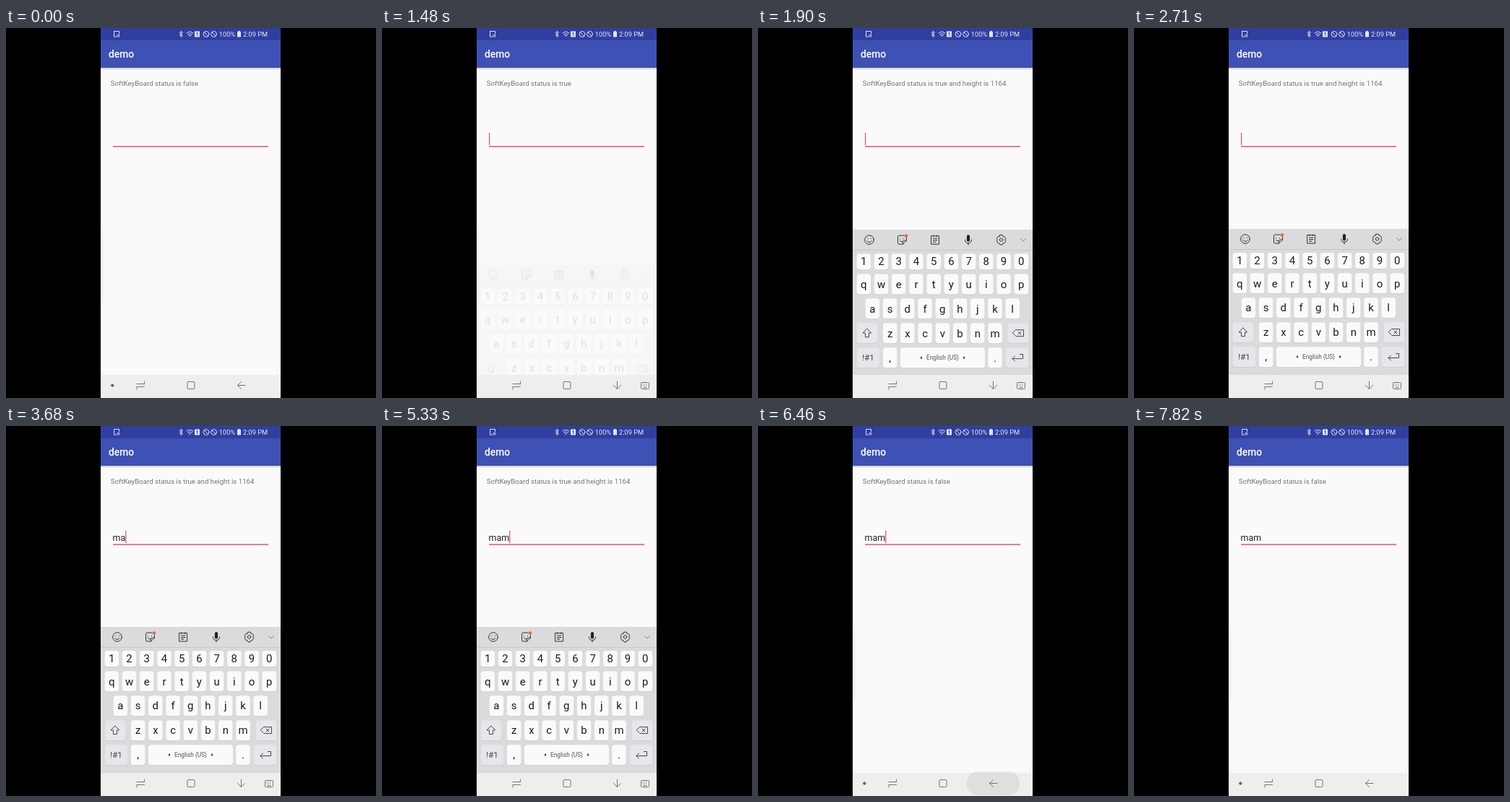
An HTML page for the animation above (8 s loop, 512 px wide and 512 px high).

```html
<!DOCTYPE html>
<html lang="en">
<head>
<meta charset="utf-8">
<title>Soft keyboard demo</title>
<style>
html, body { margin: 0; width: 100%; height: 100%; overflow: hidden; background: #000; }
svg { display: block; width: 100vw; height: 100vh; font-family: Roboto, "Noto Sans", sans-serif; }
.line { fill: none; stroke-width: 1; stroke-linecap: round; stroke-linejoin: round; }
.mid { text-anchor: middle; }
</style>
</head>
<body>
<svg viewBox="0 0 512 512">
  <defs>
    <clipPath id="screen"><rect x="131" width="249" height="512"/></clipPath>
    <clipPath id="aboveNav"><rect x="131" width="249" height="480"/></clipPath>
    <clipPath id="pill"><rect x="289" y="478" width="73" height="33" rx="15"/></clipPath>
    <linearGradient id="shade" x2="0" y2="1">
      <stop offset="0" stop-color="#c4c4c6"/><stop offset="1" stop-color="#fafafa"/>
    </linearGradient>
  </defs>
  <rect width="512" height="512"/>
  <g clip-path="url(#screen)">
    <rect x="131" width="249" height="512" fill="#fafafa"/>
    <rect x="131" y="55" width="249" height="3" fill="url(#shade)"/>
    <rect x="131" y="17" width="249" height="38" fill="#3f51b5"/>
    <rect x="131" width="249" height="17" fill="#303f9f"/>
    <text x="142" y="41.3" font-size="13.8" font-weight="500" fill="#fff">demo</text>

    <g class="line" stroke="#dfe2f0">
      <path d="M152.500 12h-3v-7.500h7v3.500"/><circle cx="155.300" cy="10.800" r="1.500"/>
      <path d="M240 6l4.400 4.400-2.200 2.200v-8.400l2.200 2.200-4.400 4.400"/>
      <path d="M250 7q4.500-3.600 9 0M251.500 9q3-2.300 6 0M253.300 10.800h2.400"/>
      <circle cx="277" cy="8.500" r="3.800"/><path d="M274.500 6l5 5"/>
      <circle cx="287.500" cy="8.500" r="3.800"/><path d="M285 6l5 5"/>
    </g>
    <path d="M261 4.500h7v8h-7z M320 5h1.300v-1h2.400v1h1.300v7.500h-5z" fill="#dfe2f0"/>
    <text class="mid" x="264.500" y="11" font-size="7" font-weight="700" fill="#303f9f">1</text>
    <g font-size="9.250" fill="#dfe2f0">
      <text x="294.800" y="12">100%</text><text x="328" y="12">2:09 PM</text>
    </g>

    <text id="status" x="144.800" y="79.700" font-size="9.680" fill="#757575"></text>
    <text id="typed" x="147.600" y="159" font-size="12.450" fill="#212121"></text>
    <rect x="148" y="163.300" width="215" height="1.400" fill="#e8447c"/>
    <rect id="caret" y="145" width="1.200" height="17" fill="#e8447c"/>
    <path d="M131 280h3M134 287v91" class="line" stroke="#ececea"/>

    <g clip-path="url(#aboveNav)"><g id="board">
      <rect x="131" y="278" width="249" height="240" fill="#dadbdd"/>
      <path d="M131 306.500h249" stroke="#c8c9cd"/>
      <g class="line" stroke="#333" stroke-width="1.200">
        <circle cx="154" cy="292" r="6.300"/><path d="M150.800 293.500q3.200 4 6.400 0M151.800 290v.3M156.200 290v.3"/>
        <path d="M202 286h-6.500q-2 0-2 2v8q0 2 2 2h5l5-5v-3.500M200.500 298v-3q0-2 2-2h3M196.500 290.500v.3M201.500 290.500v.3M196.500 293.500q1.500 2 3.500 1"/>
        <path d="M240 286.500h10.500v11.500h-10.500zM242.500 290h5.500M242.500 292.500h5.500M242.500 295h3.500M243 286v1.500M247.500 286v1.500"/>
        <path d="M286.500 292q0 4.500 4.500 4.500t4.500-4.500M291 296.500v2.500"/>
        <path d="M334.900 285.200h3.200l.8 2 2 .2 1.900 2.900-1.200 1.700 1.200 1.700-1.900 2.900-2 .2-.8 2h-3.200l-.8-2-2-.2-1.900-2.900 1.200-1.700-1.200-1.700 1.900-2.900 2-.2z"/>
        <circle cx="336.500" cy="292" r="2.200"/>
        <path d="M363.500 290.500l3.500 3.500 3.500-3.500" stroke="#858585"/>
      </g>
      <rect x="288.900" y="285" width="4.200" height="9.500" rx="2.100" fill="#222"/>
      <circle cx="205" cy="286.500" r="2.300" fill="#f0622c"/>
      <g id="keys"></g>
      <g class="line" stroke="#484848">
        <path d="M151 415l5.500 6h-3v5.500h-5v-5.500h-3z"/>
        <path d="M357 416.500h10.500v9h-10.500l-4.500-4.500zM360 419l4 4M364 419l-4 4"/>
        <path d="M366.500 450.500v6h-14.500M355.500 453l-3.500 3.500 3.500 3.500M366.500 450.500h-4"/>
      </g>
      <text class="mid" x="152.500" y="459" font-size="11.500" fill="#404040">!#1</text>
      <text class="mid" x="255.500" y="458" font-size="8.300" fill="#555">English (US)</text>
      <path d="M227 453v4l-3-2zM284 453v4l3-2z" fill="#444"/>
      <g id="popup"><rect width="38" height="64" x="-19" y="-50" rx="5" fill="#fcfcfc" stroke="#c8c9cd"/>
        <text class="mid" y="-22" font-size="22" fill="#1c1c1c"></text></g>
    </g></g>

    <rect x="131" y="480" width="249" height="32" fill="#eeeeec"/>
    <g clip-path="url(#pill)"><circle id="ripple" cx="325.500" cy="494.500" fill="#808080"/></g>
    <g class="line" stroke="#757575">
      <path d="M181 492.500h10.500v-3.500M191.500 496.500h-10.500v3.500M181 496.500h6M185.500 492.500h6"/>
      <rect x="251" y="489.500" width="10" height="10" rx="1.500"/>
      <path id="arrow" d="M331 494.500h-10.500M325.500 489.500l-5 5 5 5"/>
      <g id="switcher">
        <rect x="358.500" y="490.500" width="11" height="9" rx="1"/>
        <path d="M360.500 493h7M360.500 495h7" stroke-dasharray="1 1.500" stroke-linecap="butt"/><path d="M362 497.500h4"/>
      </g>
    </g>
    <circle id="dot" cx="147.300" cy="494.600" r="2.100" fill="#606060"/>
  </g>
</svg>
<script>
const $ = id => document.getElementById(id);
const LOOP = 8000, STEP = 24.22, HIDE = 5960;
const clamp = v => Math.max(0, Math.min(1, v));
const ramp = (t, from, to) => clamp((t - from) / (to - from));

// Last value in a [time, value] table that has been reached
const at = (table, t) => table.reduce((v, [time, next]) => t >= time ? next : v, table[0][1]);

const statuses = [[0, 'false'], [1480, 'true'], [1690, 'true and height is 1164'], [HIDE, 'false']];
const entries = [[0, ''], [3170, 'm'], [3650, 'ma'], [4230, 'mam']];
const carets = [[0, 0], [1130, 1], [2190, 0], [2710, 1], [4830, 0], [5330, 1], [5830, 0],
  [6160, 1], [6800, 0], [7300, 1], [7820, 0]];
const caretX = { '': 148, m: 158.4, ma: 165.2, mam: 176.2 };
const presses = [[3140, 3210, 'm'], [3630, 3680, 'a'], [4190, 4310, 'm']];
const keyAt = {};

function add(tag, attrs, text = '') {
  const el = document.createElementNS('http://www.w3.org/2000/svg', tag);
  for (const name in attrs) el.setAttribute(name, attrs[name]);
  el.textContent = text;
  $('keys').append(el);
}

function key(x, y, w, h, label = '', fill = '#fafafa') {
  add('rect', { x: x - w / 2, y: y - h / 2 + 0.7, width: w, height: h, rx: 4, fill: '#c6c7ca' });
  add('rect', { x: x - w / 2, y: y - h / 2, width: w, height: h, rx: 4, fill });
  if (label) add('text', { class: 'mid', x, y: y + 5.2, 'font-size': 15, fill: '#1c1c1c' }, label);
  keyAt[label] = [x, y];
}

[['1234567890', 146.3, 322, 22], ['qwertyuiop', 146.3, 353.3, 28],
  ['asdfghjkl', 158.4, 387.2, 28], ['zxcvbnm', 182.7, 421.2, 28]]
  .forEach(([row, x, y, h]) => [...row].forEach((c, i) => key(x + i * STEP, y, 19.6, h, c)));
const soft = '#e5e7ea';
key(151, 421.2, 28, 28, '', soft);
key(360, 421.2, 28, 28, '', soft);
key(152.5, 455.2, 31, 28, '', soft);
key(358.5, 455.2, 31, 28, '', soft);
key(182.7, 455.2, 19.6, 28, ',');
key(255.5, 455.2, 117, 28);
key(328, 455.2, 19.6, 28, '.');

const show = (id, k) => $(id).setAttribute('opacity', k);
const write = (el, s) => { if (el.textContent !== s) el.textContent = s; };

function draw(t) {
  write($('status'), 'SoftKeyBoard status is ' + at(statuses, t));
  const entry = at(entries, t);
  write($('typed'), entry);
  $('caret').setAttribute('x', caretX[entry]);
  show('caret', at(carets, t));

  // The keyboard eases out on its way in and eases in on its way out
  const enter = ramp(t, 1475, 2020), exit = ramp(t, HIDE, HIDE + 500);
  const drop = 51 * ((1 - enter) ** 2.5 + exit ** 2.5);
  $('board').setAttribute('transform', `translate(0 ${drop})`);
  show('board', t < 1480 ? 0 : clamp(0.12 + (t - 1480) / 280) * (1 - exit ** 2));

  const press = presses.find(([from, to]) => t >= from && t < to);
  show('popup', press ? 1 : 0);
  if (press) {
    $('popup').setAttribute('transform', `translate(${keyAt[press[2]]})`);
    write($('popup').lastElementChild, press[2]);
  }

  const open = t < HIDE ? ramp(t, 1270, 1310) : 0;
  show('switcher', open);
  show('dot', 1 - open);
  $('arrow').setAttribute('transform', open > 0.5 ? 'rotate(-90 325.5 494.5)' : '');

  $('ripple').setAttribute('r', 40 * (1 - (1 - ramp(t, 5460, 5800)) ** 2));
  show('ripple', 0.2 * ramp(t, 5440, 5560) * (1 - ramp(t, 6250, 7000)));
}

function frame() {
  draw(performance.now() % LOOP);
  requestAnimationFrame(frame);
}
frame();
</script>
</body>
</html>
```
